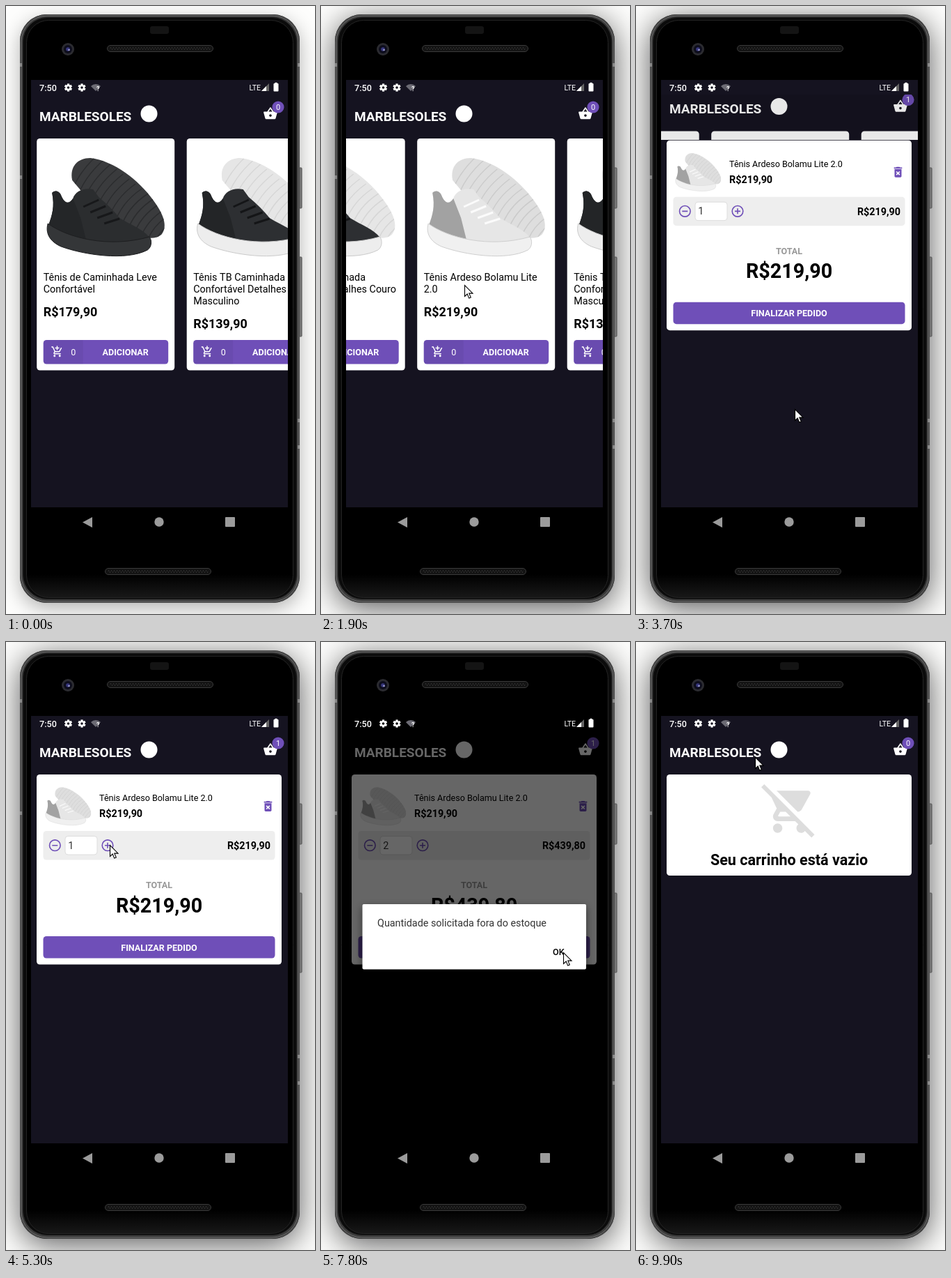
An HTML page with a canvas that plays this animation: 444x872 px, repeating every 10000 ms.

```html
<!DOCTYPE html>
<html lang="pt-BR">
<head>
<meta charset="utf-8">
<style>
html, body { margin: 0; width: 100%; height: 100%; overflow: hidden; background: #fff; }
canvas { display: block; }
</style>
</head>
<body>
<canvas id="stage" width="444" height="872"></canvas>
<script>
const ctx = document.getElementById('stage').getContext('2d');
const LOOP = 10000, STEP = 100;
const SCREEN = { x: 36, y: 106, w: 369, h: 613 };
const PAGE_TOP = 127, PAGE_H = 592;
const DP = 0.8975;
const DARK = '#151320', PURPLE = '#6f4fb8';
let backdrop = DARK;

const products = [
  { lines: ['Tênis de Caminhada Leve', 'Confortável'], price: 'R$179,90', look: 'black' },
  { lines: ['Tênis TB Caminhada', 'Confortável Detalhes Couro', 'Masculino'], price: 'R$139,90', look: 'mixed' },
  { lines: ['Tênis Ardeso Bolamu Lite', '2.0'], price: 'R$219,90', look: 'white' },
  { lines: ['Tênis TB Caminhada', 'Confortável Detalhes Couro', 'Masculino'], price: 'R$139,90', look: 'mixed' }
];

const looks = {
  black: { rear: '#3a3b3d', groove: '#2b2c2e', upper: '#2b2d2f', heel: '#242628', sole: '#343638', edge: '#1d1e20', lace: '#17181a' },
  mixed: { rear: '#e6e6e6', groove: '#d6d6d6', upper: '#2d2f32', heel: '#232527', sole: '#ededed', edge: '#cacaca', lace: '#141517' },
  white: { rear: '#dedede', groove: '#cbcbcb', upper: '#e6e6e6', heel: '#a2a2a2', sole: '#f0f0f0', edge: '#cfcfcf', lace: '#fbfbfb' }
};

const shoePaths = {
  rear: new Path2D('M38 34C34 14 46 2 64 2C98 6 134 34 154 62C169 82 176 100 166 112C158 118 148 118 140 114L60 60Z'),
  upper: new Path2D('M9 52C12 48 20 48 23 58C28 68 34 68 39 60C42 50 54 44 68 47L76 58C88 68 98 78 106 88C122 98 140 104 149 116L146 128C100 134 50 125 4 98C9 84 13 72 9 52Z'),
  heel: new Path2D('M9 52C12 48 20 48 23 58C28 68 34 68 39 60L50 88L58 120C36 114 18 106 4 98C9 84 13 72 9 52Z'),
  sole: new Path2D('M3 96C30 116 90 132 149 115C153 121 152 130 146 134C115 150 55 141 22 129C6 122-1 110 3 96Z')
};

const icons = {
  basket: new Path2D('M17.21 9l-4.38-6.56c-.19-.28-.51-.42-.83-.42-.32 0-.64.14-.83.43L6.79 9H2c-.55 0-1 .45-1 1 0 .09.01.18.04.27l2.54 9.27c.23.84 1 1.46 1.92 1.46h13c.92 0 1.69-.62 1.93-1.46l2.54-9.27L23 10c0-.55-.45-1-1-1h-4.79zM9 9l3-4.4L15 9H9zm3 8c-1.1 0-2-.9-2-2s.9-2 2-2 2 .9 2 2-.9 2-2 2z'),
  addCart: new Path2D('M11 9h2V6h3V4h-3V1h-2v3H8v2h3v3zm-4 9c-1.1 0-1.99.9-1.99 2S5.9 22 7 22s2-.9 2-2-.9-2-2-2zm10 0c-1.1 0-1.99.9-1.99 2s.89 2 1.99 2 2-.9 2-2-.9-2-2-2zm-9.83-3.25l.03-.12.9-1.63h7.45c.75 0 1.41-.41 1.75-1.03l3.86-7.01L19.42 4h-.01l-1.1 2-2.76 5H8.53l-.13-.27L6.16 6l-.95-2-.94-2H1v2h2l3.6 7.59-1.35 2.45c-.16.28-.25.61-.25.96 0 1.1.9 2 2 2h12v-2H7.42c-.13 0-.25-.11-.25-.25z'),
  noCart: new Path2D('M22.73 22.73L2.77 2.77 2 2l-.73-.73L0 2.54l4.39 4.39 2.21 4.66-1.35 2.45c-.16.28-.25.61-.25.96 0 1.1.9 2 2 2h7.46l1.38 1.38c-.5.36-.83.95-.83 1.62 0 1.1.89 2 1.99 2 .67 0 1.26-.33 1.62-.84L21.46 24l1.27-1.27zM7.42 15c-.14 0-.25-.11-.25-.25l.03-.12.9-1.63h2.36l2 2H7.42zm8.13-2c.75 0 1.41-.41 1.75-1.03l3.58-6.49c.08-.14.12-.31.12-.48 0-.55-.45-1-1-1H6.54l9.01 9zM7 18c-1.1 0-1.99.9-1.99 2S5.9 22 7 22s2-.9 2-2-.9-2-2-2z'),
  trash: new Path2D('M6 19c0 1.1.9 2 2 2h8c1.1 0 2-.9 2-2V7H6v12zm2.46-7.12l1.41-1.41L12 12.59l2.12-2.12 1.41 1.41L13.41 14l2.12 2.12-1.41 1.41L12 15.41l-2.12 2.12-1.41-1.41L10.59 14l-2.13-2.12zM15.5 4l-1-1h-5l-1 1H5v2h14V4z'),
  pointer: new Path2D('M0 0V16L3.7 12.5L6.2 18.6L8.8 17.5L6.3 11.6H11.5Z')
};

// Keys are [time, value, ...].
const scrollKeys = [[600, 0], [800, 42], [900, 87], [1100, 178], [1300, 246], [1500, 292],
  [1700, 320], [1900, 337], [2000, 337], [2200, 350], [2500, 367]];
const cursorKeys = [[100, 62, 400], [500, 304, 372], [600, 304, 372], [900, 173, 373], [1100, 95, 380],
  [1500, 150, 392], [1900, 206, 400], [2000, 206, 400], [2500, 228, 508], [3000, 228, 508],
  [3600, 228, 578], [4000, 228, 578], [4300, 239, 400], [4600, 190, 166], [4800, 125, 240],
  [4900, 144, 291], [5000, 144, 291], [5200, 156, 294], [5300, 149, 291], [6400, 149, 291],
  [6700, 184, 360], [7000, 160, 477], [7300, 113, 442], [7400, 113, 442], [7600, 240, 412],
  [7800, 348, 445], [8000, 348, 445], [8700, 376, 226], [8800, 376, 226], [8900, 379, 235],
  [9100, 379, 235], [9500, 331, 388], [9700, 331, 388], [9900, 171, 165]];

const clamp = v => Math.min(1, Math.max(0, v));
const ramp = (t, from, to) => clamp((t - from) / (to - from));

function sample(keys, t) {
  const next = keys.findIndex(k => k[0] >= t);
  if (next < 0) return keys[keys.length - 1].slice(1);
  if (next === 0) return keys[0].slice(1);
  const a = keys[next - 1], b = keys[next], f = ramp(t, a[0], b[0]);
  return a.slice(1).map((v, i) => v + (b[i + 1] - v) * f);
}

function bezierEase(x, x1, y1, x2, y2) {
  const curve = (u, a, b) => 3 * u * (1 - u) ** 2 * a + 3 * u * u * (1 - u) * b + u ** 3;
  let lo = 0, hi = 1;
  for (let i = 0; i < 24; i++) {
    const mid = (lo + hi) / 2;
    if (curve(mid, x1, x2) < x) lo = mid; else hi = mid;
  }
  return curve(hi, y1, y2);
}

function box(x, y, w, h, r, fill, stroke) {
  ctx.beginPath();
  ctx.roundRect(x, y, w, h, r);
  if (fill) { ctx.fillStyle = fill; ctx.fill(); }
  if (stroke) { ctx.strokeStyle = stroke; ctx.stroke(); }
}

function disc(x, y, r, fill) {
  ctx.beginPath();
  ctx.arc(x, y, r, 0, Math.PI * 2);
  ctx.fillStyle = fill;
  ctx.fill();
}

function poly(points, fill) {
  ctx.beginPath();
  points.forEach(p => ctx.lineTo(p[0], p[1]));
  ctx.fillStyle = fill;
  ctx.fill();
}

function label(str, x, y, size, { weight = 400, color = '#000', align = 'left' } = {}) {
  ctx.font = `${weight} ${size}px Roboto, sans-serif`;
  ctx.textAlign = align;
  ctx.fillStyle = color;
  ctx.fillText(str, x, y);
}

function icon(name, x, y, size, color) {
  ctx.save();
  ctx.translate(x, y);
  ctx.scale(size / 24, size / 24);
  ctx.fillStyle = color;
  ctx.fill(icons[name]);
  ctx.restore();
}

function clipped(x, y, w, h, paint) {
  ctx.save();
  ctx.beginPath();
  ctx.rect(x, y, w, h);
  ctx.clip();
  paint();
  ctx.restore();
}

function shoe(x, y, scale, look) {
  const c = looks[look];
  const part = name => {
    ctx.fillStyle = c[name];
    ctx.fill(shoePaths[name]);
  };
  ctx.save();
  ctx.translate(x, y);
  ctx.scale(scale, scale);
  part('rear');
  ctx.save();
  ctx.clip(shoePaths.rear);
  ctx.strokeStyle = c.groove;
  ctx.lineWidth = 1.5;
  ctx.beginPath();
  for (let i = -1; i < 14; i++) {
    ctx.moveTo(44 + i * 9, 62 + i * 6);
    ctx.quadraticCurveTo(54 + i * 9, 30 + i * 6, 84 + i * 9, 4 + i * 7);
  }
  ctx.stroke();
  ctx.restore();
  ['upper', 'heel', 'sole'].forEach(part);
  ctx.strokeStyle = c.edge;
  ctx.lineWidth = 1;
  ctx.stroke(shoePaths.sole);
  ctx.strokeStyle = c.lace;
  ctx.lineWidth = 3;
  ctx.beginPath();
  for (let i = 0; i < 4; i++) {
    ctx.moveTo(54 + i * 10, 72 + i * 8);
    ctx.lineTo(76 + i * 10, 62 + i * 9);
  }
  ctx.stroke();
  ctx.restore();
}

function phone(shade, spread) {
  ctx.fillStyle = '#fefefd';
  ctx.fillRect(0, 0, 444, 872);
  ctx.save();
  ctx.shadowColor = `rgba(0,0,0,${shade})`;
  ctx.shadowBlur = spread;
  ctx.shadowOffsetY = 8;
  box(20, 12, 402, 844, 38, '#333');
  ctx.restore();
  ctx.lineWidth = 1;
  [[232, 58], [360, 114]].forEach(([y, h]) => box(421.5, y, 3.5, h, 1, '#777', '#555'));
  box(20.5, 12.5, 401, 843, 38, '#3c3c3c', '#4a4a4a');
  box(22, 14, 398, 840, 37, null, '#6c6c6c');
  ctx.fillStyle = '#888';
  [82, 243].forEach(y => ctx.fillRect(20, y, 3, 5));
  [82, 592, 630].forEach(y => ctx.fillRect(419, y, 3, 5));
  box(24.5, 16.5, 393, 834, 35, '#0b0b0b', '#1c1c1c');
  const gloss = ctx.createLinearGradient(0, 815, 0, 852);
  gloss.addColorStop(0, '#000');
  gloss.addColorStop(1, '#1b1b1b');
  box(29.5, 20.5, 383, 828, 32, gloss, '#242424');
  box(207, 29, 27, 11, 3, '#141414');
  disc(89, 62, 9, '#2b2b30');
  disc(89, 62, 6, '#0d0d1c');
  disc(89, 62, 2.8, '#37377c');
  disc(90.5, 63, 1.3, '#a4a4d0');
  [[145, 56], [142, 806]].forEach(([x, y]) => {
    box(x + .5, y + .5, 152, 9, 4.5, '#141414', '#3a3a3a');
    ctx.fillStyle = '#303030';
    for (let i = 0; i < 72; i++) ctx.fillRect(x + 5 + i * 2, y + 3 + i % 2 * 2, 1, 2);
  });
  poly([[110, 740.5], [124, 733], [124, 748]], '#9b9b9b');
  disc(220, 740, 6.7, '#9b9b9b');
  box(315, 733, 14, 14, 1, '#9b9b9b');
}

function gear(x, y) {
  ctx.fillStyle = '#fff';
  ctx.save();
  ctx.translate(x, y);
  for (let i = 0; i < 6; i++) {
    ctx.rotate(Math.PI / 3);
    ctx.fillRect(-1.6, -5.6, 3.2, 4);
  }
  ctx.restore();
  disc(x, y, 4.2, '#fff');
  disc(x, y, 1.8, backdrop);
}

function statusBar() {
  label('7:50', 48, 121.5, 12.6, { weight: 500, color: '#fff' });
  gear(89.5, 117);
  gear(109, 117);
  ctx.beginPath();
  ctx.moveTo(129, 122);
  ctx.arc(129, 122, 10, -Math.PI * .75, -Math.PI * .25);
  ctx.fillStyle = '#6c6b74';
  ctx.fill();
  label('?', 130, 122, 9, { weight: 700, color: '#fff' });
  label('LTE', 349.5, 120.5, 10.6, { color: '#fff' });
  poly([[367, 122], [378, 111], [378, 122]], '#666');
  poly([[367, 122], [374, 115], [374, 122]], '#fff');
  box(384.5, 111, 7, 11.5, 1, '#fff');
  ctx.fillRect(386.3, 109.8, 3.4, 2);
}

function header(count) {
  label('MARBLESOLES', 48, 165, 19, { weight: 700, color: '#fff' });
  disc(205.5, 154.5, 12, '#fff');
  icon('basket', 369.2, 143.5, 24 * DP, '#fff');
  disc(391, 145, 8.6, PURPLE);
  label(count, 391, 149, 11, { color: '#fff', align: 'center' });
}

function productCard(x, item, count) {
  box(x, 190, 198, 332.5, 4.5, '#fff');
  shoe(x + 13, 216, 1, item.look);
  item.lines.forEach((line, i) => label(line, x + 9.5, 394 + i * 16.83, 16 * DP));
  label(item.price, x + 9.5, 411.8 + item.lines.length * 16.83, 20 * DP, { weight: 700 });
  box(x + 9.5, 479, 179.5, 34.5, 4.5, PURPLE);
  box(x + 9.5, 479, 57, 34.5, [4.5, 0, 0, 4.5], 'rgba(0,0,0,.05)');
  icon('addCart', x + 20.3, 486.7, 20 * DP, '#fff');
  label(count, x + 49, 501, 14 * DP, { color: '#fff' });
  label('ADICIONAR', x + 127.5, 501, 14 * DP, { weight: 700, color: '#fff', align: 'center' });
}

function pageBase() {
  ctx.fillStyle = backdrop;
  ctx.fillRect(SCREEN.x, SCREEN.y, SCREEN.w, SCREEN.h + 40);
}

function listPage(t, count) {
  pageBase();
  header(count);
  const [scroll] = sample(scrollKeys, t);
  products.forEach((item, i) => {
    productCard(44.2 + i * 215.5 - scroll, item, i === 2 ? count : 0);
  });
}

function roundButton(x, y, plus, alpha) {
  ctx.save();
  ctx.globalAlpha = alpha;
  ctx.strokeStyle = PURPLE;
  ctx.lineWidth = 1.6;
  ctx.beginPath();
  ctx.arc(x, y, 7.8, 0, Math.PI * 2);
  ctx.moveTo(x - 4, y);
  ctx.lineTo(x + 4, y);
  if (plus) {
    ctx.moveTo(x, y - 4);
    ctx.lineTo(x, y + 4);
  }
  ctx.stroke();
  ctx.restore();
}

function cartPage(t) {
  const amount = t < 5700 ? 1 : 2;
  const total = amount === 1 ? 'R$219,90' : 'R$439,80';
  pageBase();
  header(1);
  box(44, 190, 352, 272.5, 4.5, '#fff');
  shoe(56, 207.5, .388, 'white');
  label('Tênis Ardeso Bolamu Lite 2.0', 134, 228, 14 * DP);
  label('R$219,90', 134, 251.3, 16 * DP, { weight: 700 });
  icon('trash', 366.5, 225.5, 20, PURPLE);
  box(53.5, 271, 333, 41.5, 4.5, '#eee');
  roundButton(70.3, 291.7, false, 1);
  roundButton(146, 291.7, true, t >= 5500 && t < 5700 ? .4 : 1);
  ctx.lineWidth = 1;
  box(85, 278.5, 46, 26.5, 4, '#fff', '#ddd');
  label(amount, 89.3, 296.5, 16 * DP, { color: '#333' });
  label(total, 380, 297, 16 * DP, { weight: 700, align: 'right' });
  label('TOTAL', 220, 353, 14 * DP, { weight: 700, color: '#999', align: 'center' });
  label(total, 220, 387.5, 32 * DP, { weight: 700, align: 'center' });
  box(53.5, 422, 333, 31.5, 4.5, PURPLE);
  label('FINALIZAR PEDIDO', 220, 442.5, 14 * DP, { weight: 700, color: '#fff', align: 'center' });
}

function emptyPage() {
  pageBase();
  header(0);
  box(44, 190, 352, 145, 4.5, '#fff');
  icon('noCart', 180, 199.7, 90 * DP, '#ddd');
  label('Seu carrinho está vazio', 220, 319.5, 24 * DP, { weight: 700, align: 'center' });
}

function alertBox(alpha) {
  ctx.save();
  ctx.globalAlpha = alpha;
  ctx.save();
  ctx.shadowColor = 'rgba(0,0,0,.5)';
  ctx.shadowBlur = 12;
  ctx.shadowOffsetY = 4;
  box(59.5, 376, 321.5, 93.5, 2, '#fff');
  ctx.restore();
  label('Quantidade solicitada fora do estoque', 81, 407.5, 16 * DP, { color: '#333' });
  label('OK', 333, 449, 14 * DP, { weight: 500 });
  ctx.restore();
}

function pages(t) {
  if (t >= 9200) return emptyPage();
  const reveal = bezierEase(ramp(t, 3533, 3958), .20833, .82, .25, 1);
  const rest = 1 - reveal;
  if (reveal < 1) {
    ctx.save();
    ctx.translate(0, -.02 * PAGE_H * reveal);
    listPage(t, t < 3200 ? 0 : 1);
    ctx.restore();
    ctx.fillStyle = `rgba(0,0,0,${.1 * reveal})`;
    ctx.fillRect(SCREEN.x, PAGE_TOP, SCREEN.w, PAGE_H);
  }
  if (reveal > 0) {
    clipped(SCREEN.x, PAGE_TOP + PAGE_H * rest, SCREEN.w, PAGE_H, () => {
      ctx.translate(0, .041 * PAGE_H * rest);
      cartPage(t);
    });
  }
}

function cursor(t) {
  if (t < 100) return;
  const [x, y] = sample(cursorKeys, t);
  ctx.save();
  ctx.translate(x + .5, y + .5);
  ctx.lineWidth = 1.1;
  ctx.fillStyle = '#fff';
  ctx.strokeStyle = '#000';
  ctx.fill(icons.pointer);
  ctx.stroke(icons.pointer);
  ctx.restore();
}

function draw(t) {
  const alert = ramp(t, 6030, 6180) * (1 - ramp(t, 8030, 8180));
  backdrop = alert === 1 ? '#000' : DARK;
  if (t < 700) phone(.3, 28); else phone(.65, 46);
  ctx.fillStyle = backdrop;
  ctx.fillRect(SCREEN.x, SCREEN.y, SCREEN.w, SCREEN.h);
  clipped(SCREEN.x, PAGE_TOP, SCREEN.w, PAGE_H, () => pages(t));
  if (alert > 0) {
    ctx.fillStyle = `rgba(0,0,0,${.6 * alert})`;
    ctx.fillRect(SCREEN.x, SCREEN.y, SCREEN.w, SCREEN.h);
    alertBox(alert);
  }
  statusBar();
  cursor(t);
}

const start = performance.now();
function tick() {
  const t = (performance.now() - start) % LOOP;
  draw(Math.floor(t / STEP) * STEP);
  requestAnimationFrame(tick);
}
tick();
</script>
</body>
</html>
```
